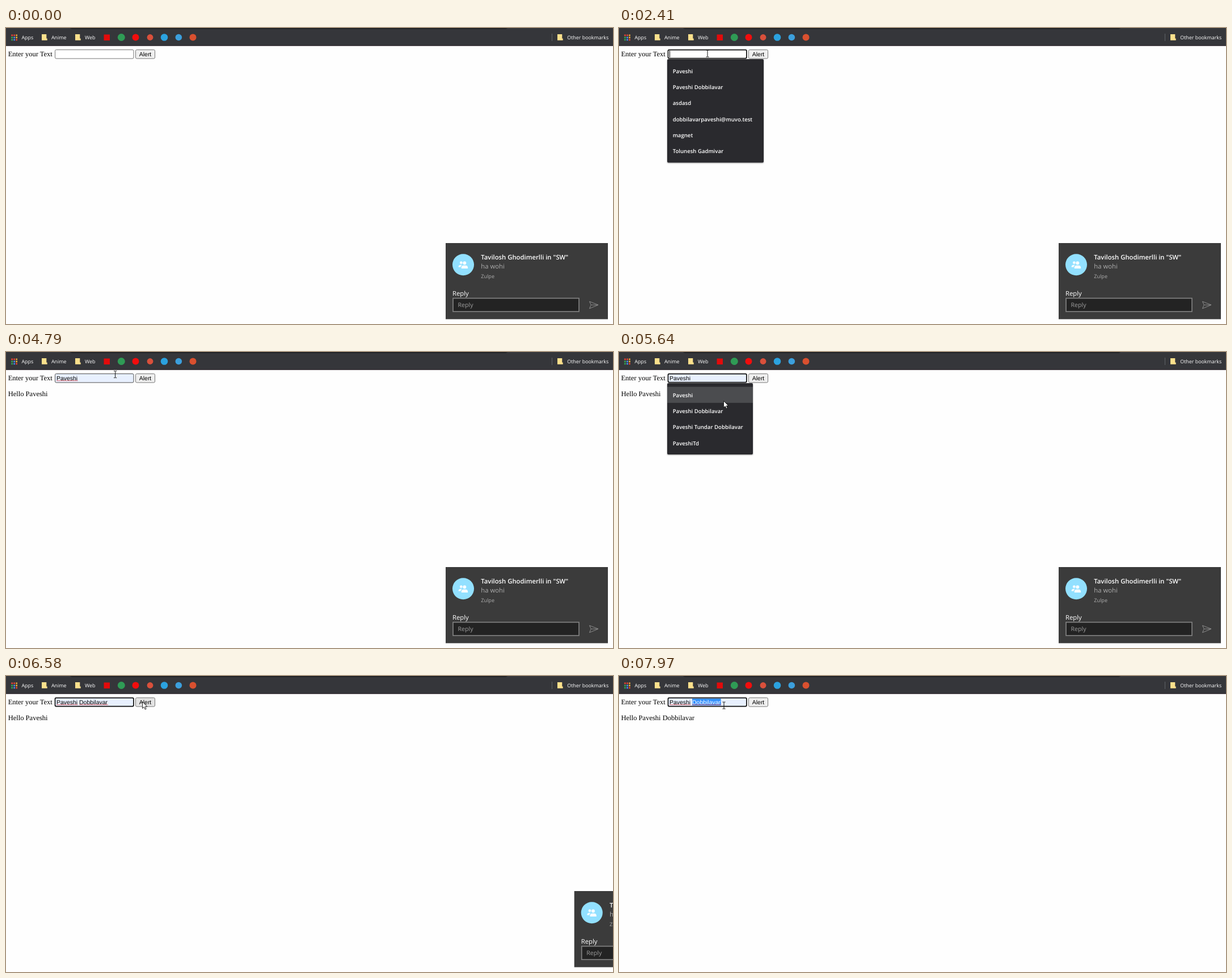
Animation, 1070 px wide and 523 px high, one loop 8 s. Source, as an HTML page:

```html
<!DOCTYPE html>
<html lang="en">
<head>
<meta charset="utf-8">
<title>Alert form</title>
<style>
  html, body { margin: 0; width: 100%; height: 100%; overflow: hidden; background: #fefefe; }
  svg { display: block; width: 100vw; height: 100vh; }
  text { white-space: pre; text-rendering: geometricPrecision; }
  .ui { font-family: "Open Sans", "Noto Sans", sans-serif; }
  .page { font: 12.53px "Liberation Serif", serif; }
  .field { font: 10.44px "Liberation Sans", sans-serif; }
  .bar { font-size: 8.9px; font-weight: 500; fill: #fff; }
  .item { font-size: 9.6px; font-weight: 600; fill: #fff; }
  .toast { font-size: 11.3px; }
</style>
</head>
<body>
<svg id="stage" viewBox="0 0 1070 523" preserveAspectRatio="none">
  <defs>
    <filter id="shade" x="-5%" y="-5%" width="110%" height="112%">
      <feDropShadow dx="0" dy="1" stdDeviation="1" flood-opacity=".4"/>
    </filter>
  </defs>

  <g class="page">
    <text x="3.7" y="50">Enter your Text</text>
    <text id="hello" x="3.7" y="78"></text>
  </g>

  <g class="field">
    <rect id="box" rx="2"/>
    <rect id="mark" x="129" y="40" width="50.6" height="12" fill="#3390ff"/>
    <text x="89" y="50"><tspan id="first"></tspan><tspan id="last"></tspan></text>
    <g fill="none" stroke="#e0343c" stroke-width=".8">
      <path id="wave1"/>
      <path id="wave2"/>
    </g>
    <rect id="caret" y="40" width="1" height="12"/>
    <rect id="button" x="228.5" y="38.5" width="34" height="15.5" rx="2" stroke="#767676"/>
    <text x="234.8" y="50">Alert</text>
  </g>

  <g id="toast" class="ui toast">
    <rect x="775" y="380" width="286" height="134.5" fill="#3b3b3b"/>
    <circle cx="806" cy="418.3" r="19" fill="#92e0ff"/>
    <g fill="#f6fcff">
      <circle cx="802.3" cy="414.7" r="2.4"/>
      <path d="M797.5 422.6q0-4 4-4h2.2q-2 2-2 4z"/>
      <circle cx="808.3" cy="415.2" r="3"/>
      <path d="M802.7 425v-1.6q0-4 4-4h3.4q4 0 4 4V425z"/>
    </g>
    <text x="837.3" y="409" font-size="11.3" font-weight="600" fill="#fff">Tavilosh Ghodimerlli in "SW"</text>
    <text x="837.3" y="424.6" fill="#adadad">ha wohi</text>
    <text x="837.3" y="441.6" font-size="9.1" fill="#adadad">Zulpe</text>
    <text x="787" y="473.2" fill="#fff">Reply</text>
    <rect x="788" y="477.5" width="222" height="23.5" fill="#232323" stroke="#858585" stroke-width="1.6"/>
    <text x="796.5" y="492.6" font-size="10.6" fill="#9f9f9f">Reply</text>
    <path d="M1028.5 483.2 1044 489.3 1028.5 495.7 1031.3 489.3zM1031.3 489.3H1044" fill="none" stroke="#8c8c8c"/>
  </g>

  <g id="menuA" class="ui"></g>
  <g id="menuB" class="ui"></g>

  <g id="bar" class="ui bar">
    <rect width="1070" height="31" fill="#35363a"/>
    <rect y="30.5" width="1070" height="1.3" fill="#2b242a"/>
    <rect x="112" y="-10" width="773" height="12" rx="5" fill="#202124"/>
    <rect x="962" y="10" width="1" height="13" fill="#606267"/>
    <text x="27.5" y="20">Apps</text>
    <text x="80" y="20">Anime</text>
    <text x="139" y="20">Web</text>
    <text x="989.3" y="20">Other bookmarks</text>
  </g>

  <path id="arrow" d="M.5.5V12.2L3.2 9.7 5.2 14 7.1 13.2 5.2 9H8.9z" fill="#fff" stroke="#111" stroke-width=".9" stroke-linejoin="round"/>
  <path id="beam" d="M-2.5-6H-.7L0-5.4.7-6H2.5M0-5.4V5.4M-2.5 6H-.7L0 5.4.7 6H2.5" fill="none" stroke="#111"/>
</svg>

<script>
const LOOP = 8000, STEP = 77.5;
const FIRST = 'Paveshi', LAST = 'Dobbilavar';
const $ = id => document.getElementById(id);

function set(el, attrs) {
  for (const k in attrs) el.setAttribute(k, attrs[k]);
  return el;
}

function add(parent, tag, attrs, text = '') {
  const el = set(document.createElementNS('http://www.w3.org/2000/svg', tag), attrs);
  el.textContent = text;
  return parent.appendChild(el);
}

const show = (el, on) => el.setAttribute('visibility', on ? 'visible' : 'hidden');
const within = (t, a, b) => t >= a && t < b;

// Bookmark icons
const bar = $('bar');
['#ea4335', '#ea4335', '#e8a33d', '#34a853', '#4a8af4', '#f4b62c', '#34a853', '#4a8af4', '#ea4335']
  .forEach((fill, i) => add(bar, 'rect', {
    x: 9.3 + i % 3 * 4, y: 11.5 + Math.floor(i / 3) * 4, width: 2.7, height: 2.7, fill
  }));
for (const x of [63, 122, 972]) {
  add(bar, 'path', { d: `M${x} 11h8.3v7.5h1.4v3.2h-9.7z`, fill: '#fbe08c' });
}
add(bar, 'rect', { x: 172.5, y: 11.5, width: 10.5, height: 10.5, fill: '#e20b0b' });
[[203.3, 6.5, '#2f9b55'], [228.5, 6, '#f20d0d'], [254, 5.4, '#d9503b'],
 [279, 6.3, '#2ba2df'], [304.3, 5.8, '#3c9fdc'], [329.5, 6, '#d9502f']]
  .forEach(([cx, r, fill]) => add(bar, 'circle', { cx, cy: 16.5, r, fill }));

// Suggestion lists
const ROW = 28.35;
function menu(id, width, items) {
  const g = $(id);
  add(g, 'rect', {
    x: 85, y: 55, width, height: 12.6 + ROW * items.length, rx: 2, fill: '#29292d', filter: 'url(#shade)'
  });
  const hover = add(g, 'rect', { x: 85, width, height: ROW, fill: '#4b4c4f' });
  items.forEach((s, i) => add(g, 'text', { class: 'item', x: 94.7, y: 79.6 + i * ROW }, s));
  return (on, row) => {
    show(g, on);
    show(hover, on && row >= 0);
    hover.setAttribute('y', 61.5 + Math.max(row, 0) * ROW);
  };
}
const full = `${FIRST} ${LAST}`;
const menuA = menu('menuA', 170, [FIRST, full, 'asdasd', 'dobbilavarpaveshi@muvo.test', 'magnet', 'Tolunesh Gadmivar']);
const menuB = menu('menuB', 151, [FIRST, full, `${FIRST} Tundar ${LAST}`, `${FIRST}Td`]);

function wave(id, from, to) {
  let d = `M${from} 51.3`;
  for (let x = from, up = true; x < to; x += 1.5, up = !up) d += `l1.5 ${up ? -1.3 : 1.3}`;
  $(id).setAttribute('d', d);
}
wave('wave1', 89, 126);
wave('wave2', 129, 179);

// Pointer path: time, x, y
const PATH = [
  [140, 1040, 499], [290, 985, 474], [600, 600, 335], [905, 386, 255], [990, 386, 255],
  [1220, 230, 120], [1450, 149, 38.5], [1765, 149, 38.5], [1920, 153, 41], [2085, 153, 41],
  [2320, 156, 45], [3080, 156, 45], [3240, 157, 66], [3690, 157, 66], [3990, 240, 44],
  [4240, 240, 44], [4460, 244, 31], [4550, 244, 31], [4830, 184, 41], [5470, 184, 41],
  [5620, 184, 86], [5710, 184, 86], [5790, 185, 100], [6100, 185, 100], [6480, 240, 45],
  [7050, 240, 45], [7570, 185, 53.9], [7670, 185, 53.9], [7900, 185, 52]
];
// Notification offset: time, x
const SLIDE = [[6380, 0], [6460, 70], [6572, 226.5], [6660, 266], [6810, 296]];

function at(keys, t) {
  const i = keys.findIndex(k => k[0] > t);
  if (i < 0) return keys[keys.length - 1].slice(1);
  if (i === 0) return keys[0].slice(1);
  const a = keys[i - 1], b = keys[i], f = (t - a[0]) / (b[0] - a[0]);
  return a.slice(1).map((v, j) => v + (b[j + 1] - v) * f);
}

function draw(t) {
  const tick = 140 + Math.floor((t - 132) / STEP) * STEP;
  const [x, y] = at(PATH, tick);
  const inRow = y > 37.9 && y < 54.5;
  const overBox = inRow && x > 86 && x < 225;
  const overButton = inRow && x > 228 && x < 262;
  const seen = t >= 140;

  show($('arrow'), seen && !overBox);
  show($('beam'), seen && overBox);
  $('arrow').setAttribute('transform', `translate(${x} ${y})`);
  $('beam').setAttribute('transform', `translate(${x} ${y})`);

  const focus = within(t, 2320, 4090) || within(t, 4920, 6730) || t >= 7670;
  const filled = t >= 3240;
  const two = t >= 5740;
  const picked = t >= 7750;
  const preview = within(t, 3240, 3400) || within(t, 5550, 6040);

  set($('box'), focus
    ? { x: 86.5, y: 38.7, width: 138.4, height: 14.9, stroke: '#101010', 'stroke-width': 1.7 }
    : { x: 86.5, y: 38.5, width: 138.5, height: 15.5, stroke: overBox ? '#4f4f4f' : '#767676', 'stroke-width': 1 });
  $('box').setAttribute('fill', filled ? '#e8f0fe' : '#fff');
  $('first').textContent = filled ? FIRST : '';
  $('last').textContent = two ? ' ' + LAST : '';
  $('last').setAttribute('fill', picked ? '#fff' : '#000');
  show($('mark'), picked);
  show($('wave1'), filled && !preview);
  show($('wave2'), two && !preview);

  const caret = within(t, 2320, 2860) || within(t, 3400, 4090) || within(t, 4920, 5550);
  show($('caret'), caret);
  $('caret').setAttribute('x', filled ? 126 : 89);

  const pressed = within(t, 4090, 4170) || within(t, 6730, 6810);
  $('button').setAttribute('fill', pressed ? '#f5f5f5' : overButton ? '#e3e3e3' : '#efefef');
  $('hello').textContent = t < 4170 ? '' : 'Hello ' + (t < 6810 ? FIRST : full);

  menuA(within(t, 2380, 3470), t >= 3240 ? 0 : -1);
  menuB(within(t, 5000, 6040), t < 5550 ? -1 : two ? 1 : 0);

  const [shift] = at(SLIDE, tick);
  $('toast').setAttribute('transform', `translate(${shift} 0)`);
}

const start = performance.now();
function frame() {
  draw((performance.now() - start) % LOOP);
  requestAnimationFrame(frame);
}
draw(0);
requestAnimationFrame(frame);
</script>
</body>
</html>
```
